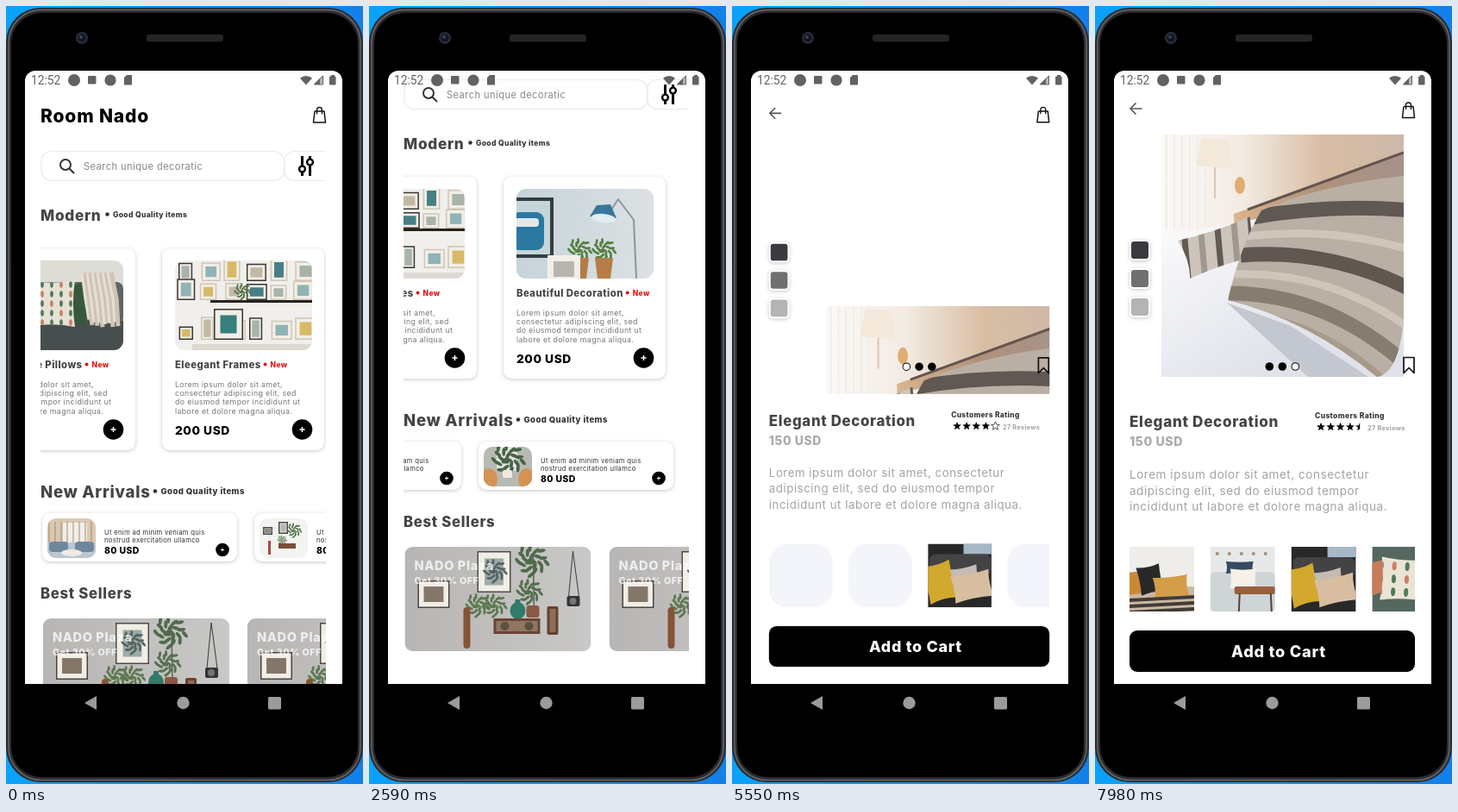
An HTML page with a canvas that plays this animation: 414 by 902 pixels, repeating every 8 s.

```html
<!DOCTYPE html>
<html lang="en">
<head>
<meta charset="utf-8">
<title>Decoration shop app</title>
<style>
html, body { margin: 0; width: 100%; height: 100%; overflow: hidden; background: #128cf0; }
canvas { display: block; width: 414px; height: 902px; }
</style>
</head>
<body>
<canvas id="stage"></canvas>
<script>
const canvas = document.getElementById('stage');
const c = canvas.getContext('2d');
const dpr = window.devicePixelRatio || 1;
canvas.width = 414 * dpr;
canvas.height = 902 * dpr;

// Timing
const LOOP = 8000;
const easeOut = u => 1 - (1 - u) ** 2;
const easeInOut = u => (1 - Math.cos(Math.PI * u)) / 2;
const tween = (t, start, end, from, to, ease = easeInOut) =>
  from + (to - from) * ease(Math.min(1, Math.max(0, (t - start) / (end - start))));

// Drawing helpers
const random = seed => (Math.sin(seed * 127.1 + 3) * 43758.5 % 1 + 1) % 1;

function repeat(count, draw) { for (let i = 0; i < count; i++) draw(i); }

function group(draw) { c.save(); draw(); c.restore(); }

function box(color, x, y, w, h, r = 0) {
  c.fillStyle = color;
  c.beginPath();
  c.roundRect(x, y, w, h, r);
  c.fill();
}

function frame(color, x, y, w, h, width = 1, r = 0) {
  c.strokeStyle = color;
  c.lineWidth = width;
  c.beginPath();
  c.roundRect(x, y, w, h, r);
  c.stroke();
}

function clipBox(x, y, w, h, r = 0) {
  c.beginPath();
  c.roundRect(x, y, w, h, r);
  c.clip();
}

function disc(color, x, y, r, ry = r, turn = 0) {
  c.fillStyle = color;
  c.beginPath();
  c.ellipse(x, y, r, ry, turn, 0, 7);
  c.fill();
}

function trace(points) {
  c.beginPath();
  for (let i = 0; i < points.length; i += 2) c.lineTo(points[i], points[i + 1]);
}

function poly(color, ...points) {
  c.fillStyle = color;
  trace(points);
  c.fill();
}

function line(color, width, ...points) {
  c.strokeStyle = color;
  c.lineWidth = width;
  trace(points);
  c.stroke();
}

function curve(color, width, x1, y1, cx, cy, x2, y2) {
  c.strokeStyle = color;
  c.lineWidth = width;
  c.beginPath();
  c.moveTo(x1, y1);
  c.quadraticCurveTo(cx, cy, x2, y2);
  c.stroke();
}

// Inter is narrower than the wide look wanted here, so it is tracked out a little.
function text(str, x, y, size, color, weight = 800, family = 'Inter') {
  c.font = `${weight} ${size}px ${family}, sans-serif`;
  c.letterSpacing = family === 'Inter' ? `${size * .04}px` : '0px';
  c.fillStyle = color;
  c.fillText(str, x, y);
  return c.measureText(str).width;
}

function fade(x1, y1, x2, y2, ...colors) {
  const g = c.createLinearGradient(x1, y1, x2, y2);
  colors.forEach((color, i) => g.addColorStop(i / (colors.length - 1), color));
  return g;
}

function raised(x, y, w, h, r) {
  group(() => {
    c.shadowColor = 'rgba(0,0,0,.22)';
    c.shadowBlur = 4 * dpr;
    c.shadowOffsetY = dpr;
    box('#fff', x, y, w, h, r);
  });
}

// Things seen in the pictures
function plant(x, y, r, color = '#4e7045') {
  repeat(22, i => {
    const a = i * 2.4, d = r * Math.sqrt(i / 22);
    disc(color, x + d * Math.cos(a), y + d * Math.sin(a), r * .26, r * .11, a + random(i));
  });
}

function picture(x, y, w, h, edge, tone) {
  const s = Math.min(w, h) * .22;
  box(edge, x, y, w, h);
  box('#f1eee6', x + 1.5, y + 1.5, w - 3, h - 3);
  box(tone, x + s, y + s, w - 2 * s, h - 2 * s);
}

// A cushion with slightly hollow sides; the pattern is drawn around its centre.
function cushion(color, x, y, w, h, turn = 0, pattern = () => {}) {
  group(() => {
    c.translate(x, y);
    c.rotate(turn);
    c.scale(w / 2, h / 2);
    c.beginPath();
    c.moveTo(-1, -1);
    c.quadraticCurveTo(0, -.8, 1, -1);
    c.quadraticCurveTo(.85, 0, 1, 1);
    c.quadraticCurveTo(0, .8, -1, 1);
    c.quadraticCurveTo(-.85, 0, -1, -1);
    c.fillStyle = color;
    c.fill();
    c.clip();
    c.scale(2 / w, 2 / h);
    pattern();
  });
}

function cactusPattern(step) {
  repeat(25, i => disc(i % 3 ? '#4d7b5a' : '#cb8060',
    (i % 5 - 2) * step, (Math.floor(i / 5) - 2) * step, step * .17, step * .33));
}

function photo(x, y, w, h, r, paint) {
  group(() => {
    clipBox(x, y, w, h, r);
    c.translate(x, y);
    paint();
  });
}

// Pictures, each in its own local pixels
function sofaPillows() {
  box('#dddcd7', 0, 0, 159, 104);
  box('#5f6665', 0, 25, 159, 50, 8);
  box('#474d4d', 0, 70, 159, 34);
  cushion('#d6d3cb', 28, 50, 44, 48);
  cushion('#37583f', 100, 50, 34, 50);
  cushion('#e6e0d5', 76, 50, 54, 54, 0, () => cactusPattern(11));
  repeat(12, i => line(i % 2 ? '#cfc4b4' : '#e6dfd2', 5,
    112 + i * 3, 14, 116 + i * 3.2, 45, 120 + i * 3, 66 + random(i) * 12));
}

function frameWall() {
  box('#f0efec', 0, 0, 159, 104);
  const tones = ['#a8b3aa', '#8fb3b6', '#d8b968', '#c2b8a6', '#477f86'];
  repeat(18, i => {
    const w = 14 + random(i) * 11, h = 15 + random(i + 40) * 13;
    const x = i % 6 * 27 + random(i + 80) * 5, y = [24, 46, 92][Math.floor(i / 6)] - h;
    picture(x, y, w, h, i % 3 ? '#cfc5b4' : '#3a3632', tones[i % 5]);
  });
  picture(45, 56, 34, 36, '#33322f', '#357f7d');
  box('#25221f', 41, 46, 118, 3);
  plant(78, 36, 9);
  box('#ddd9d2', 20, 97, 139, 7);
}

function lampDesk() {
  box(fade(0, 0, 159, 0, '#c6d3d9', '#dce1e3'), 0, 0, 159, 104);
  box('#353c42', 0, 10, 43, 70);
  box('#c4d6da', 0, 14, 39, 62);
  box('#2b78a1', -6, 27, 38, 44, 9);
  box('#dfe9e9', -6, 34, 32, 10, 4);
  line('#8b959b', 2, 106, 30, 118, 12, 136, 36, 139, 104);
  poly('#39779a', 85, 32, 93, 19, 109, 18, 116, 34);
  disc('#e1eef1', 101, 34, 14, 5, .1);
  repeat(2, i => {
    plant(73 + i * 28, 71, 13, '#54803f');
    poly('#b57c46', 63 + i * 28, 80, 84 + i * 28, 80, 81 + i * 28, 104, 66 + i * 28, 104);
  });
  picture(36, 77, 38, 32, '#f4f3ef', '#b6b6af');
}

function livingRoom() {
  box('#d8c8b3', 0, 0, 56, 46);
  box('#f1eee8', 18, 5, 28, 23);
  repeat(8, i => line('#a98a66', 1, 2 + i * 7, 4, 2 + i * 7, 29));
  box('#bac6d0', 0, 28, 56, 18);
  repeat(2, i => box('#6f879d', 2 + i * 30, 27, 22, 12, 4));
  disc('#efeae2', 28, 40, 12, 4);
}

function plantShelf() {
  box('#f3f3f1', 0, 0, 56, 46);
  picture(4, 10, 11, 9, '#4a4641', '#8d8f8c');
  picture(22, 4, 11, 14, '#4a4641', '#aeb9b4');
  plant(40, 14, 8);
  plant(26, 25, 5);
  box('#7a4e37', 22, 29, 20, 6);
  box('#a64c3b', 10, 26, 3, 16);
}

function plantChairs() {
  box('#b7bab3', 0, 0, 56, 46);
  box('#e3e6e2', 15, 0, 24, 28);
  plant(28, 15, 18, '#476445');
  repeat(2, i => disc('#d59255', 6 + i * 44, 38, 10, 13));
  box('#efe9dc', 22, 27, 11, 9, 2);
}

function gallery() {
  box(fade(0, 0, 216, 0, '#b8b6b4', '#c9c8c6'), 0, 0, 216, 122);
  picture(15, 39, 37, 32, '#484441', '#85766a');
  picture(84, 5, 39, 48, '#4c4b49', '#9caaaa');
  plant(104, 28, 13, '#55645f');
  line('#596453', 1.5, 150, 80, 149, 8);
  plant(147, 16, 18, '#4f6a4b');
  plant(144, 52, 14, '#55704e');
  repeat(2, i => plant(84 + i * 20, 68, 13, '#5c7851'));
  box('#8c5844', 141, 68, 15, 14, 3);
  disc('#327a69', 131, 74, 9, 10);
  box('#327a69', 128, 61, 6, 8);
  box('#6a4534', 103, 83, 54, 18);
  box('#8f7562', 106, 86, 48, 12);
  repeat(2, i => disc('#5c5040', 116 + i * 28, 92, 5));
  box('#67412f', 165, 69, 13, 33, 2);
  box('#8b6f5b', 168, 72, 7, 27);
  box('#855334', 68, 70, 8, 48, 4);
  line('#3a3a3a', 1, 190, 58, 195, 5, 202, 58);
  box('#343434', 188, 57, 15, 12, 2);
  disc('#747474', 195, 63, 4);
}

function bedroom() {
  box(fade(0, 0, 281, 0, '#fbf9f6', '#f3ebe3', '#d8bda3', '#cdb8a8'), 0, 0, 281, 281);
  poly(fade(80, 0, 281, 0, '#dcb68f', '#b0917b', '#a4938a'), 84, 92, 281, 21, 281, 80, 85, 115);
  line('#65544d', 3, 100, 87, 281, 21);
  repeat(6, i => line('#f1ede8', 2, 6 + i * 9, 0, 6 + i * 9, 110));
  line('#d9c7b3', 2, 62, 38, 62, 74);
  poly('#f3e8da', 46, 5, 77, 5, 82, 39, 41, 36);
  disc('#dfad72', 91, 59, 6, 10);
  poly(fade(0, 110, 120, 281, '#fafafb', '#dfe2ea'), 0, 118, 110, 98, 281, 90, 281, 281, 0, 281);
  cushion('#cdc5bc', 68, 131, 88, 46, -.32, () =>
    repeat(5, i => line(i % 2 ? '#a0978e' : '#625a55', 7, i * 20 - 48, 30, i * 20 - 34, -30)));
  poly('#c3c7cf', 76, 195, 150, 222, 240, 281, 170, 281);
  c.beginPath();
  c.moveTo(77, 192);
  c.quadraticCurveTo(92, 128, 116, 88);
  c.quadraticCurveTo(185, 58, 281, 48);
  c.lineTo(281, 215);
  c.quadraticCurveTo(275, 277, 250, 281);
  c.quadraticCurveTo(170, 215, 77, 192);
  c.fillStyle = '#b9afa4';
  c.fill();
  c.clip();
  const stripes = ['#5f5853', '#cfc6bb', '#5f5750', '#cfc6bb', '#877c70', '#a79a8b'];
  stripes.forEach((color, i) => curve(color, i % 2 ? 9 : 17,
    106 - i * 7, 96 + i * 22, 195, 80 + i * 26, 290, 88 + i * 46));
}

const thumbnails = [
  () => {
    box('#efede9', 0, 0, 75, 75);
    box('#cab9a2', 0, 46, 75, 29);
    cushion('#ca8937', 6, 42, 24, 28, -.1);
    cushion('#292829', 24, 38, 27, 33, -.2);
    cushion('#d39d47', 48, 46, 40, 24, -.1);
    repeat(3, i => line('#423b36', 4, 0, 62 + i * 7, 75, 58 + i * 7));
  },
  () => {
    box('#e7e9e9', 0, 0, 75, 75);
    repeat(5, i => disc('#a58d78', 8 + i * 14, 8, 2));
    box('#cfd4d6', 0, 29, 75, 46, 6);
    cushion('#354b62', 34, 24, 32, 14);
    cushion('#f5f1e9', 38, 37, 30, 23);
    box('#98603d', 28, 46, 47, 9, 2);
    repeat(2, i => line('#514139', 2, 34 + i * 36, 54, 33 + i * 38, 75));
  },
  () => {
    box('#282828', 0, 0, 75, 75);
    box('#a6b8c7', 42, 0, 33, 12);
    box('#434346', 2, 12, 72, 25, 7);
    cushion('#d2a82e', 14, 45, 34, 46, -.25);
    cushion('#c4bbb3', 44, 40, 32, 26, -.2);
    cushion('#d8bea1', 52, 50, 46, 32, -.2);
  },
  () => {
    box('#56675f', 0, 0, 75, 75);
    cushion('#c77d59', 8, 35, 26, 40, -.2);
    cushion('#e9e4d4', 40, 38, 60, 50, .05, () => cactusPattern(15));
  }
];

const products = [
  ['Decorative Pillows', sofaPillows],
  ['Eleegant Frames', frameWall],
  ['Beautiful Decoration', lampDesk]
];
const arrivals = [livingRoom, plantShelf, plantChairs];

// Interface pieces
function bag(x, y) {
  c.lineJoin = 'round';
  line('#111', 1.5, x + 2, y + 5, x + 13, y + 5, x + 14.5, y + 18, x + .5, y + 18, x + 2, y + 5);
  c.lineWidth = 1.3;
  c.beginPath();
  c.moveTo(x + 4.5, y + 8.5);
  c.arc(x + 7.5, y + 3.5, 3, Math.PI, 0);
  c.lineTo(x + 10.5, y + 8.5);
  c.stroke();
}

function plusButton(x, y, r) {
  disc('#000', x, y, r);
  const s = r * .26;
  line('#fff', r * .13, x - s, y, x + s, y);
  line('#fff', r * .13, x, y - s, x, y + s);
}

function star(x, y, kind) {
  const points = [];
  for (let i = kind === 'half' ? 5 : 0; i <= 10; i++) {
    const r = i % 2 ? 2.3 : 5.2, a = i * Math.PI / 5;
    points.push(x + r * Math.sin(a), y - r * Math.cos(a));
  }
  kind === 'outline' ? line('#222', .8, ...points) : poly('#000', ...points);
}

function paragraph(lines, x, y, size, leading, color) {
  lines.forEach((s, i) => text(s, x, y + i * leading, size, color, 400));
}

function heading(title, y, size, noteSize, dotX) {
  text(title, 40, y, size, '#444');
  if (!noteSize) return;
  disc('#333', dotX, y - 7, 2.3);
  text('Good Quality items', dotX + 6.5, y - 3.5, noteSize, '#333');
}

function row(top, height, offset, draw) {
  group(() => {
    clipBox(40, top, 331, height);
    c.translate(-offset, 0);
    repeat(3, draw);
  });
}

function productCard(i, veil) {
  const x = 41 + i * 219, [name, paint] = products[i];
  raised(x, 281, 188, 234, 9);
  photo(x + 15, 295, 159, 104, 11, paint);
  const end = x + 15 + text(name, x + 15, 420, 11.3, '#444');
  disc('#e01414', end + 5, 415.5, 2);
  text('New', end + 11, 419, 8.5, '#e01414');
  paragraph(['Lorem ipsum dolor sit amet,', 'consectetur adipiscing elit, sed',
    'do eiusmod tempor incididunt ut', 'labore et dolore magna aliqua.'],
    x + 15, 442, 8.8, 10.2, '#777');
  text('200 USD', x + 15, 497, 13.8, '#000');
  plusButton(x + 162.5, 491, 11.8);
  if (veil && i === 0) box(`rgba(244,244,243,${veil})`, x, 281, 188, 234, 9);
}

function arrivalCard(i) {
  const x = 42 + i * 246;
  raised(x, 588, 226, 56, 9);
  photo(x + 6, 594, 56, 46, 10, arrivals[i]);
  paragraph(['Ut enim ad minim veniam quis', 'nostrud exercitation ullamco'],
    x + 72, 613, 7.65, 9, '#333');
  text('80 USD', x + 72, 635, 10.4, '#000');
  plusButton(x + 209, 630.5, 7.8);
}

function bannerCard(i) {
  const x = 43 + i * 237;
  photo(x, 710, 216, 121, 9, gallery);
  text('NADO Plaza', x + 11, 737, 14.6, 'rgba(255,255,255,.75)');
  text('Get 30% OFF', x + 11, 753, 10.8, 'rgba(255,255,255,.75)');
}

function searchBar() {
  clipBox(40, 160, 331, 50);
  frame('#ebebeb', 41, 168.5, 281.5, 34, 1.2, 11);
  frame('#ebebeb', 323, 168.5, 60, 34, 1.2, 11);
  c.strokeStyle = '#333';
  c.lineWidth = 2;
  c.beginPath();
  c.arc(69, 184, 6, 0, 7);
  c.moveTo(73.5, 188.5);
  c.lineTo(79, 194);
  c.stroke();
  text('Search unique decoratic', 90, 190, 11.1, '#888', 400);
  repeat(2, i => {
    const x = 343.5 + i * 9, y = 189 - i * 8;
    line('#000', 3, x, 174, x, 197);
    disc('#000', x, y, 4.6);
    disc('#fff', x, y, 2.2);
  });
}

function home(t) {
  box('#fff', 22, 75, 368, 711);
  c.translate(0, -tween(t, 770, 1060, 0, 83, easeOut));
  text('Room Nado', 40, 135, 21, '#000');
  bag(356, 117);
  group(searchBar);

  heading('Modern', 248.5, 17.2, 8.5, 117.5);
  const productOffset = t < 3540
    ? tween(t, 30, 580, 79, 323, easeOut)
    : tween(t, 3540, 4160, 323, 0);
  const veil = tween(t, 4190, 4330, 0, .78) - tween(t, 4380, 4600, 0, .78);
  row(276, 248, productOffset, i => productCard(i, veil));

  heading('New Arrivals', 569.5, 18.6, 9.6, 173);
  row(583, 68, t < 1480 ? 0 : tween(t, 1480, 2220, 8, 407), arrivalCard);

  heading('Best Sellers', 686.5, 16.8);
  row(705, 132, tween(t, 2560, 3330, 0, 380), bannerCard);
}

function hero(t) {
  const page = tween(t, 6560, 6920, 0, 1) + tween(t, 7040, 7700, 0, 1);
  const drift = tween(t, 5450, 6000, 1, 0, easeOut);
  group(() => {
    clipBox(40, 149, 331, 301);
    if (t > 5480) repeat(3, i =>
      photo(77 + (i - page) * 331 + 45 * drift, 149 + 296 * drift, 281, 281, 0, bedroom));
  });
  repeat(3, i => {
    disc('#000', 202.3 + i * 15, 418, 4.8);
    if (i === Math.round(page)) disc('#fff', 202.3 + i * 15, 418, 3.8);
  });
}

function detail(t) {
  c.globalAlpha = tween(t, 4850, 5130, 0, 1);
  box('#fff', 22, 75, 368, 711);
  const zoom = tween(t, 5270, 5750, .9, 1, easeOut);
  c.translate(205.5, 430);
  c.scale(zoom, zoom);
  c.translate(-205.5, -430);

  line('#555', 1.6, 54.5, 119, 41, 119);
  line('#555', 1.6, 47.5, 112.5, 41, 119, 47.5, 125.5);
  bag(356, 111.5);
  hero(t);
  ['#3a3a40', '#707072', '#b4b4b5'].forEach((color, i) => {
    raised(40, 271 + i * 33, 24, 24, 5);
    box(color, 42, 273 + i * 33, 20, 20, 3);
  });
  line('#111', 1.7, 358, 407.5, 370, 407.5, 370, 425.5, 364, 419.5, 358, 425.5, 358, 406.7);

  text('Elegant Decoration', 40, 488, 17.1, '#444');
  text('150 USD', 40, 510, 14.2, '#aaa');
  text('Customers Rating', 255, 478, 8.5, '#333');
  repeat(4, i => star(262 + i * 11.3, 488, 'full'));
  star(307.2, 488, t < 6930 ? 'outline' : 'half');
  text('27 Reviews', 316, 492, 7.3, '#aaa');
  paragraph(['Lorem ipsum dolor sit amet, consectetur', 'adipiscing elit, sed do eiusmod tempor',
    'incididunt ut labore et dolore magna aliqua.'], 40, 548, 13.5, 18.6, '#a3a3a3');

  group(() => {
    clipBox(40, 620, 331, 90);
    thumbnails.forEach((paint, i) => {
      const x = 40 + i * 93.8, loadedAt = i === 2 ? 5500 : 5650 + i * 30;
      if (t >= loadedAt) photo(x, 627, 75, 75, 0, paint);
      else box('#f4f5fa', x, 627, 75, 75, 22);
    });
  });

  box('#000', 40, 724, 331, 48, 9);
  c.textAlign = 'center';
  text('Add to Cart', 213, 755, 18.2, '#fff');
}

function phone() {
  box(fade(0, 0, 414, 0, '#0aa2fa', '#1380ea'), 0, 0, 414, 902);
  box('#2b2c2f', 0, 2, 414, 898, 40);
  frame('#66676b', 3, 4.5, 408, 893, 1.5, 38);
  box('#000', 6, 8, 402, 886, 35);
  disc('#282c38', 88, 37, 7);
  disc('#11141d', 88, 37, 4.5);
  disc('#34405c', 87, 36, 2);
  box('#242424', 163, 33, 89, 8.5, 3);
  poly('#9b9b9b', 91, 808, 105, 800, 105, 816);
  disc('#9b9b9b', 205.5, 808, 7.2);
  box('#9b9b9b', 304, 801, 15, 14.5, 1.5);
}

function statusBar() {
  const grey = '#626262';
  text('12:52', 29, 91, 13.8, grey, 400, 'Roboto');
  disc(grey, 79, 86, 7);
  box(grey, 95, 81, 9.5, 9.5, 1);
  disc(grey, 121, 86, 6.6);
  poly(grey, 140, 80, 146, 80, 146, 91.5, 137, 91.5, 137, 83);
  c.beginPath();
  c.moveTo(348, 91.5);
  c.arc(348, 91.5, 10.5, -2.3, -.84);
  c.fill();
  poly('#b5b5b5', 357, 91, 368, 91, 368, 80);
  poly(grey, 357, 91, 364, 91, 364, 84);
  line(grey, 1, 357.5, 91, 367.5, 91, 367.5, 81, 357.5, 91);
  box(grey, 377, 80, 4, 2);
  box(grey, 375, 81.5, 7.5, 10, 1);
}

function render(t) {
  c.setTransform(dpr, 0, 0, dpr, 0, 0);
  phone();
  group(() => {
    clipBox(22, 75, 368, 711, [12, 12, 0, 0]);
    if (t < 5130) group(() => home(t));
    if (t > 4850) group(() => detail(t));
    statusBar();
  });
}

function tick() {
  render(performance.now() % LOOP);
  requestAnimationFrame(tick);
}
tick();
</script>
</body>
</html>
```
